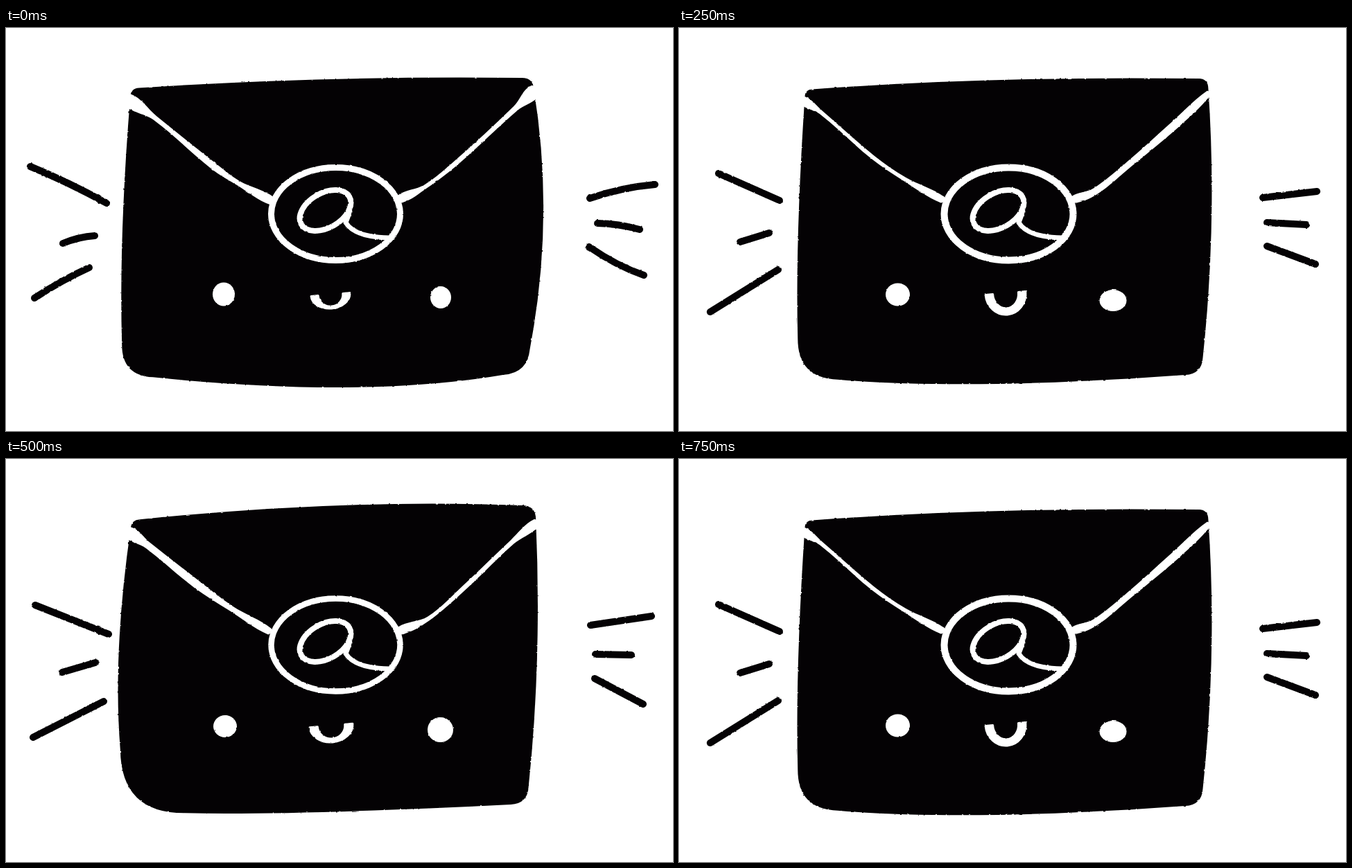
An HTML page that plays this animation: 962x582 px, repeating every 1 s.

```html
<!DOCTYPE html>
<html lang="en">
<head>
<meta charset="utf-8">
<title>Happy envelope</title>
<style>
  html, body { margin: 0; width: 100%; height: 100%; overflow: hidden; background: #fff; }
  svg { display: block; width: 100%; height: 100%; }
  path { stroke-linecap: round; stroke-linejoin: round; }
</style>
</head>
<body>
<svg viewBox="0 0 962 582">
  <filter id="rough" filterUnits="userSpaceOnUse" x="0" y="0" width="962" height="582" color-interpolation-filters="sRGB">
    <feTurbulence type="fractalNoise" baseFrequency="0.25" numOctaves="1" seed="4"/>
    <feDisplacementMap in="SourceGraphic" scale="2.5" xChannelSelector="R" yChannelSelector="G"/>
  </filter>
  <g id="drawing" filter="url(#rough)"></g>
</svg>
<script>
const INK = '#040204', PAPER = '#fff', FRAME_MS = 250;

// corners: x, y, radius (clockwise from top left); sides: point halfway along the edge after each corner
// folds: x, y, half width from the envelope corner to the seal; eyes: centre, radii
// mouth: centre, radii, lip thickness; rays: two ends, optional bend
const wide = {
  corners: [[180, 87, 12], [760, 72, 16], [752, 498, 34], [167, 502, 45]],
  sides: [[465, 74], [775, 275], [490, 519], [168, 290]],
  folds: [
    [[175, 103, 9], [215, 130, 3.5], [300, 200, 5], [335, 224, 3.5], [384, 250, 6]],
    [[763, 90, 9], [735, 116, 4], [650, 194, 3.5], [605, 229, 3], [568, 247, 6]]
  ],
  sealWidth: 9,
  eyes: [[314, 384.5, 16, 17], [627, 389, 15, 16]],
  mouth: [468, 385, 28, 20, 3],
  rays: [[35, 200, 145, 253, -4], [82, 311, 128, 300, -4], [41, 390, 120, 346, -4],
    [842, 246, 936, 226, -6], [853, 282, 914, 291, -4], [841, 316, 920, 357, 7]]
};

const calm = {
  corners: [[182, 89, 10], [763, 73, 14], [754, 500, 24], [171, 506, 58]],
  sides: [[465, 75], [768, 280], [450, 514], [172, 290]],
  folds: [
    [[178, 104, 6], [205, 122, 3], [280, 187, 3], [325, 218, 3], [380, 248, 5]],
    [[764, 94, 4], [715, 140, 6], [650, 196, 4.5], [600, 236, 5], [568, 248, 5]]
  ],
  sealWidth: 10,
  eyes: [[315.5, 385, 17.5, 16.5], [626, 393.5, 19.5, 15.5]],
  mouth: [471, 383, 29, 31, 9],
  rays: [[57, 210, 145, 249], [88, 309, 130, 296], [45, 410, 143, 349],
    [842, 245, 920, 236], [848, 281, 905, 284], [848, 315, 918, 341]]
};

const tilted = {
  corners: [[181, 88, 12], [764, 67, 20], [752, 498, 24], [166, 512, 92]],
  sides: [[480, 67], [766, 285], [450, 510], [163, 270]],
  folds: [
    [[176, 105, 8], [205, 125, 5], [275, 181, 6], [325, 216, 4], [380, 249, 5]],
    [[765, 92, 6], [730, 120, 3.5], [665, 182, 3.5], [610, 230, 3], [568, 248, 6]]
  ],
  sealWidth: 8.5,
  eyes: [[316, 386, 17, 16], [626.5, 391, 18.5, 18]],
  mouth: [469, 385, 31, 24, 5],
  rays: [[42, 211, 148, 253], [81, 308, 129, 294], [39, 402, 141, 350],
    [843, 240, 931, 227], [850, 282, 902, 283], [849, 317, 919, 354]]
};

const path = (d, fill, stroke = 'none', width = 0, transform = '') =>
  `<path d="${d}" fill="${fill}" stroke="${stroke}" stroke-width="${width}" transform="${transform}"/>`;

const ellipse = ([cx, cy, rx, ry], fill, stroke = 'none', width = 0, turn = 0) =>
  `<ellipse cx="${cx}" cy="${cy}" rx="${rx}" ry="${ry}" fill="${fill}" stroke="${stroke}"
    stroke-width="${width}" transform="rotate(${turn} ${cx} ${cy})"/>`;

function toward([x, y], [tx, ty], distance) {
  const k = distance / Math.hypot(tx - x, ty - y);
  return [x + (tx - x) * k, y + (ty - y) * k];
}

// Rounded corners joined by edges that bow through the side points.
function envelope({ corners, sides }) {
  const bends = corners.map((corner, i) => ({
    corner: corner.slice(0, 2),
    enter: toward(corner, sides[(i + 3) % 4], corner[2]),
    leave: toward(corner, sides[i], corner[2])
  }));
  let d = 'M' + bends[0].leave;
  sides.forEach((side, i) => {
    const { corner, enter, leave } = bends[(i + 1) % 4];
    const control = side.map((v, axis) => 2 * v - (bends[i].leave[axis] + enter[axis]) / 2);
    d += `Q${control} ${enter}Q${corner} ${leave}`;
  });
  return path(d + 'Z', INK);
}

// Smooth closed curve; handles scale with segment length to avoid overshoot.
function smooth(points) {
  const at = i => points[(i + points.length) % points.length];
  const handle = (i, length) => {
    const [ax, ay] = at(i - 1), [bx, by] = at(i + 1);
    const k = length / 3 / Math.hypot(bx - ax, by - ay);
    return [(bx - ax) * k, (by - ay) * k];
  };
  let d = 'M' + points[0];
  for (let i = 0; i < points.length; i++) {
    const [x0, y0] = at(i), [x1, y1] = at(i + 1);
    const length = Math.hypot(x1 - x0, y1 - y0);
    const [ux, uy] = handle(i, length), [vx, vy] = handle(i + 1, length);
    d += `C${x0 + ux},${y0 + uy} ${x1 - vx},${y1 - vy} ${x1},${y1}`;
  }
  return d + 'Z';
}

// Brush stroke whose width follows its spine.
function fold(spine) {
  const edge = side => spine.map(([x, y, half], i) => {
    const [ax, ay] = spine[Math.max(0, i - 1)];
    const [bx, by] = spine[Math.min(spine.length - 1, i + 1)];
    const k = side * half / Math.hypot(bx - ax, by - ay);
    return [x - (by - ay) * k, y + (bx - ax) * k];
  });
  return path(smooth([...edge(1), ...edge(-1).reverse()]), PAPER);
}

function seal(width) {
  return ellipse([475.5, 268.5, 93, 67], INK, PAPER, width)
    + ellipse([460.5, 263.5, 40, 25], 'none', PAPER, 8, -30)
    + path('M497 248Q498 262 490 281Q503 302 552 303', 'none', PAPER, 7);
}

function mouth([cx, cy, rx, ry, lip]) {
  const innerX = rx * 0.64, innerY = ry - lip;
  const d = `M${-rx} 0A${rx} ${ry} 0 0 0 ${rx} 0H${innerX}A${innerX} ${innerY} 0 0 1 ${-innerX} 0Z`;
  return path(d, PAPER, PAPER, 3, `translate(${cx} ${cy}) rotate(-5)`);
}

function ray([x0, y0, x1, y1, bend = 0]) {
  return path(`M${x0} ${y0}Q${(x0 + x1) / 2} ${(y0 + y1) / 2 + bend} ${x1} ${y1}`, 'none', INK, 10);
}

const render = pose => [
  envelope(pose),
  ...pose.folds.map(fold),
  seal(pose.sealWidth),
  ...pose.eyes.map(eye => ellipse(eye, PAPER)),
  mouth(pose.mouth),
  ...pose.rays.map(ray)
].join('');

const sequence = [wide, calm, tilted, calm].map(render);
const drawing = document.getElementById('drawing');
let shown = -1;

function update(now) {
  const index = Math.floor(now / FRAME_MS) % sequence.length;
  if (index !== shown) drawing.innerHTML = sequence[shown = index];
}

function tick() {
  update(performance.now());
  requestAnimationFrame(tick);
}
tick();
</script>
</body>
</html>
```
